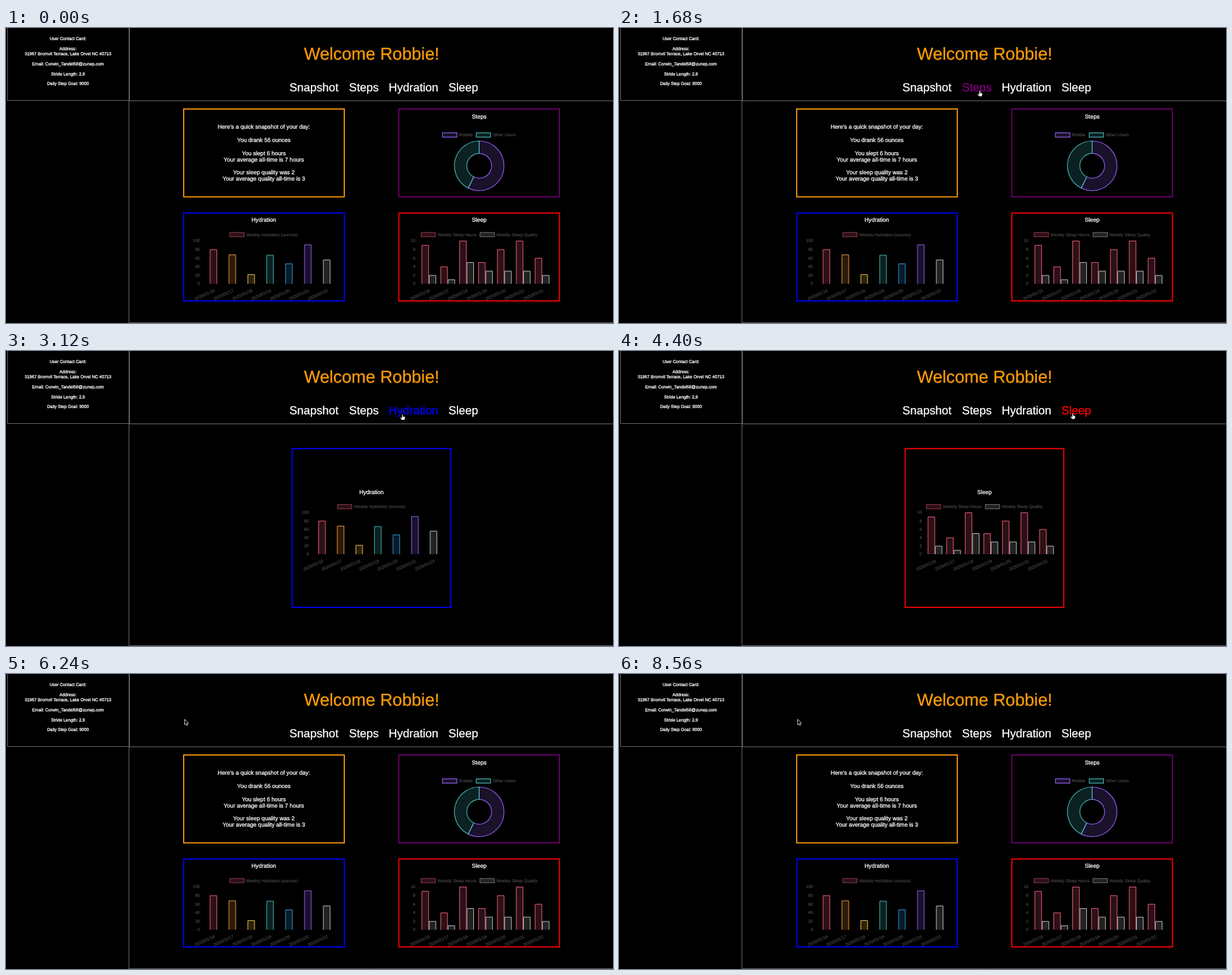
An HTML page with a canvas that plays this animation: 960 px wide and 466 px high, repeating every 8640 ms.

```html
<!DOCTYPE html>
<html lang="en">
<head>
<meta charset="utf-8">
<title>Activity dashboard</title>
<style>
html, body { margin: 0; width: 100%; height: 100%; overflow: hidden; background: #000; }
canvas { display: block; }
</style>
</head>
<body>
<canvas width="960" height="466"></canvas>
<script>
const ctx = document.querySelector('canvas').getContext('2d');
ctx.textRendering = 'geometricPrecision';

const LOOP = 8640, STEP = 80;
const USER = 'Robbie';
const SMALL = 6.8, BODY = 9.05, NAV = 18.36;
const LABEL = '#606060', AMBER = '#ff9c08';

const PINK = '255,99,132', ORANGE = '255,159,64', YELLOW = '255,205,86', TEAL = '75,192,192',
      BLUE = '54,162,235', PURPLE = '153,102,255', GREY = '201,203,207';

const navItems = [
  { label: 'Snapshot', x: 448.3, w: 77.5, color: AMBER },
  { label: 'Steps', x: 542.4, w: 47, color: 'purple' },
  { label: 'Hydration', x: 605.2, w: 78.5, color: '#00f' },
  { label: 'Sleep', x: 699.7, w: 47, color: '#f00' }
];

const hydration = {
  title: 'Hydration', max: 100,
  sets: [{ label: 'Weekly Hydration (ounces)', values: [80, 68, 22, 67, 47, 91, 56],
           colors: [PINK, ORANGE, YELLOW, TEAL, BLUE, PURPLE, GREY] }]
};
const sleep = {
  title: 'Sleep', max: 10,
  sets: [{ label: 'Weekly Sleep Hours', values: [9, 4, 10, 5, 8, 10, 6], colors: [PINK] },
         { label: 'Weekly Sleep Quality', values: [2, 1, 5, 3, 3, 3, 2], colors: [GREY] }]
};
const small = { top: 33, height: 68, pitch: 29.85, first: -79.6, axis: -100.8 };
const large = { top: 32.5, height: 66, pitch: 29.4, first: -78.2, axis: -99 };

// Views and the times they open
const views = [[0, 'all'], [1840, 'steps'], [3040, 'hydration'], [4320, 'sleep'], [5440, 'all']];

// Pointer: time, x, y
const track = [
  [400, 640, 470], [1280, 570.5, 99], [2240, 570.5, 99], [2480, 603.7, 99], [2640, 627, 100],
  [3520, 627, 100], [4160, 717.5, 98.5], [4560, 717.5, 98.5], [5120, 488, 99], [5520, 488, 99],
  [6000, 282.5, 71.5], [LOOP, 282.5, 71.5]
];

function text(str, x, y, size, color = '#fff', align = 'center') {
  ctx.font = `${size}px "Liberation Sans", Arial, sans-serif`;
  ctx.textAlign = align;
  ctx.fillStyle = ctx.strokeStyle = color;
  ctx.fillText(str, x, y + size * 0.36);
  if (color === LABEL) return;
  // A hairline outline gives the heavier smoothed look
  ctx.lineWidth = 0.3;
  ctx.strokeText(str, x, y + size * 0.36);
}

function line(x1, y1, x2, y2, color) {
  ctx.strokeStyle = color;
  ctx.lineWidth = 1;
  ctx.beginPath();
  ctx.moveTo(x1, y1);
  ctx.lineTo(x2, y2);
  ctx.stroke();
}

function frame(x, y, w, h, color, width = 1.8) {
  ctx.strokeStyle = color;
  ctx.lineWidth = width;
  ctx.strokeRect(x, y, w, h);
}

function paint(rgb, width, alpha = 0.9) {
  ctx.fillStyle = `rgba(${rgb},.17)`;
  ctx.strokeStyle = `rgba(${rgb},${alpha})`;
  ctx.lineWidth = width;
}

function legend(cx, y, items, stroke, alpha) {
  ctx.font = `${SMALL}px "Liberation Sans", Arial, sans-serif`;
  const widths = items.map(([label]) => 26.1 + ctx.measureText(label).width);
  let x = cx - (widths.reduce((a, b) => a + b) + 5.7 * (items.length - 1)) / 2;
  items.forEach(([label, rgb], i) => {
    paint(rgb, stroke, alpha);
    ctx.fillRect(x, y - 3.4, 22.7, 6.8);
    ctx.strokeRect(x, y - 3.4, 22.7, 6.8);
    text(label, x + 26.1, y, SMALL, LABEL, 'left');
    x += widths[i] + 5.7;
  });
}

function bar(x, y, w, h, rgb) {
  paint(rgb, 1);
  ctx.fillRect(x, y, w, h);
  ctx.beginPath();
  ctx.moveTo(x + 0.5, y + h);
  ctx.lineTo(x + 0.5, y + 0.5);
  ctx.lineTo(x + w - 0.5, y + 0.5);
  ctx.lineTo(x + w - 0.5, y + h);
  ctx.stroke();
}

function barChart({ title, max, sets }, cx, y, size) {
  const bottom = y + size.top + size.height, w = 11.5;
  text(title, cx, y, BODY);
  legend(cx, y + 23.4, sets.map(s => [s.label, s.colors[0]]), 0.8, 0.65);
  for (let i = 0; i <= 5; i++)
    text(max * i / 5, cx + size.axis, bottom - size.height * i / 5, SMALL, LABEL, 'right');
  for (let i = 0; i < 7; i++) {
    const mid = cx + size.first + i * size.pitch;
    sets.forEach((set, n) => {
      const h = size.height * set.values[i] / max;
      bar(mid + (n - sets.length / 2) * w, bottom - h, w, h, set.colors[i % set.colors.length]);
    });
    ctx.save();
    ctx.translate(mid + 1.5, bottom + 10.2);
    ctx.rotate(-0.42);
    text('2020/01/' + (16 + i), 0, 0, SMALL, LABEL, 'right');
    ctx.restore();
  }
}

function slice(cx, cy, r, from, to, rgb) {
  paint(rgb, 1.2);
  ctx.beginPath();
  ctx.arc(cx, cy, r, from, to);
  ctx.arc(cx, cy, r / 2, to, from, true);
  ctx.closePath();
  ctx.fill();
  ctx.stroke();
}

function stepsChart(cx, y, cy, r) {
  const top = -Math.PI / 2, split = top + 3.6;
  text('Steps', cx, y, BODY);
  legend(cx, y + 29, [[USER, PURPLE], ['Other Users', TEAL]], 1.2);
  slice(cx, cy, r, top, split, PURPLE);
  slice(cx, cy, r, split, top + 2 * Math.PI, TEAL);
}

function drawPage(hovered) {
  ctx.fillStyle = '#000';
  ctx.fillRect(0, 0, 960, 466);
  line(2.5, 0, 2.5, 114, '#666');
  line(2, 114.5, 195, 114.5, '#666');
  line(194.5, 0, 194.5, 466, '#6a6a6a');
  line(195.5, 0, 195.5, 115, '#555');
  line(195, 115, 960, 115, '#777');
  line(195, 465.5, 960, 465.5, '#6a6062');

  [['User Contact Card:', 16.5], ['Address:', 32.5],
   ['31967 Bromvil Terrace, Lake Orvel NC 40713', 40.6],
   ['Email: Corwin_Tandel58@zunep.com', 56.4],
   ['Stride Length: 2.9', 72.2], ['Daily Step Goal: 9000', 88]
  ].forEach(([str, y]) => text(str, 98, y, SMALL));

  text(`Welcome ${USER}!`, 578.3, 39.9, 27.2, AMBER);
  for (const item of navItems)
    text(item.label, item.x, 93.3, NAV, item === hovered ? item.color : '#fff', 'left');
}

function drawView(view) {
  if (view === 'all') {
    frame(281, 127.9, 254, 138.8, AMBER);
    [["Here's a quick snapshot of your day:", 156.2], ['You drank 56 ounces', 176.8],
     ['You slept 6 hours', 197.3], ['Your average all-time is 7 hours', 207.5],
     ['Your sleep quality was 2', 227.8], ['Your average quality all-time is 3', 238]
    ].forEach(([str, y]) => text(str, 407.8, y, BODY));
    frame(621.3, 127.9, 254, 138.8, 'purple', 1.5);
    stepsChart(748.4, 140, 217.7, 39.2);
    frame(281, 292.3, 254, 138.8, '#00f');
    barChart(hydration, 407.7, 303, small);
    frame(621.3, 292.3, 254, 138.8, '#f00');
    barChart(sleep, 748.4, 303, small);
    return;
  }
  if (view === 'steps') {
    frame(452.6, 154.2, 250.8, 250.8, '#90009a', 1.3);
    stepsChart(578, 166, 300, 95);
  } else {
    frame(452.6, 154.2, 250.8, 250.8, view === 'sleep' ? '#f00' : '#00f');
    barChart(view === 'sleep' ? sleep : hydration, 578, 222.5, large);
  }
}

function pointerAt(t) {
  const i = track.findIndex(p => p[0] > t);
  if (i < 1) return null;
  const [t0, x0, y0] = track[i - 1], [t1, x1, y1] = track[i];
  const u = (t - t0) / (t1 - t0), k = u * u * (3 - 2 * u);
  return { x: x0 + (x1 - x0) * k, y: y0 + (y1 - y0) * k };
}

const arrow = new Path2D('M0 0V8.6L2 6.9 3.4 9.9 4.8 9.3 3.5 6.4H6.1Z');
const hand = new Path2D('M-.8.5Q0-.5.8.5V3.3L3.6 4Q4.4 4.3 4.2 5.5L3.4 9H-1L-3.4 5.6Q-3.2 4.4-2 5.1L-.8 6Z');

function drawPointer({ x, y }, isHand) {
  ctx.save();
  ctx.translate(x, y);
  ctx.lineWidth = isHand ? 0.6 : 0.9;
  ctx.fillStyle = isHand ? '#fff' : '#000';
  ctx.strokeStyle = isHand ? '#222' : '#ddd';
  ctx.fill(isHand ? hand : arrow);
  ctx.stroke(isHand ? hand : arrow);
  ctx.restore();
}

function render(now) {
  const t = Math.floor(now % LOOP / STEP) * STEP;
  const pointer = pointerAt(t);
  const hovered = pointer && navItems.find(n =>
    pointer.x > n.x && pointer.x < n.x + n.w && pointer.y > 83 && pointer.y < 105);
  drawPage(hovered);
  drawView(views.filter(v => v[0] <= t).pop()[1]);
  if (pointer) drawPointer(pointer, hovered);
  requestAnimationFrame(render);
}
requestAnimationFrame(render);
</script>
</body>
</html>
```
